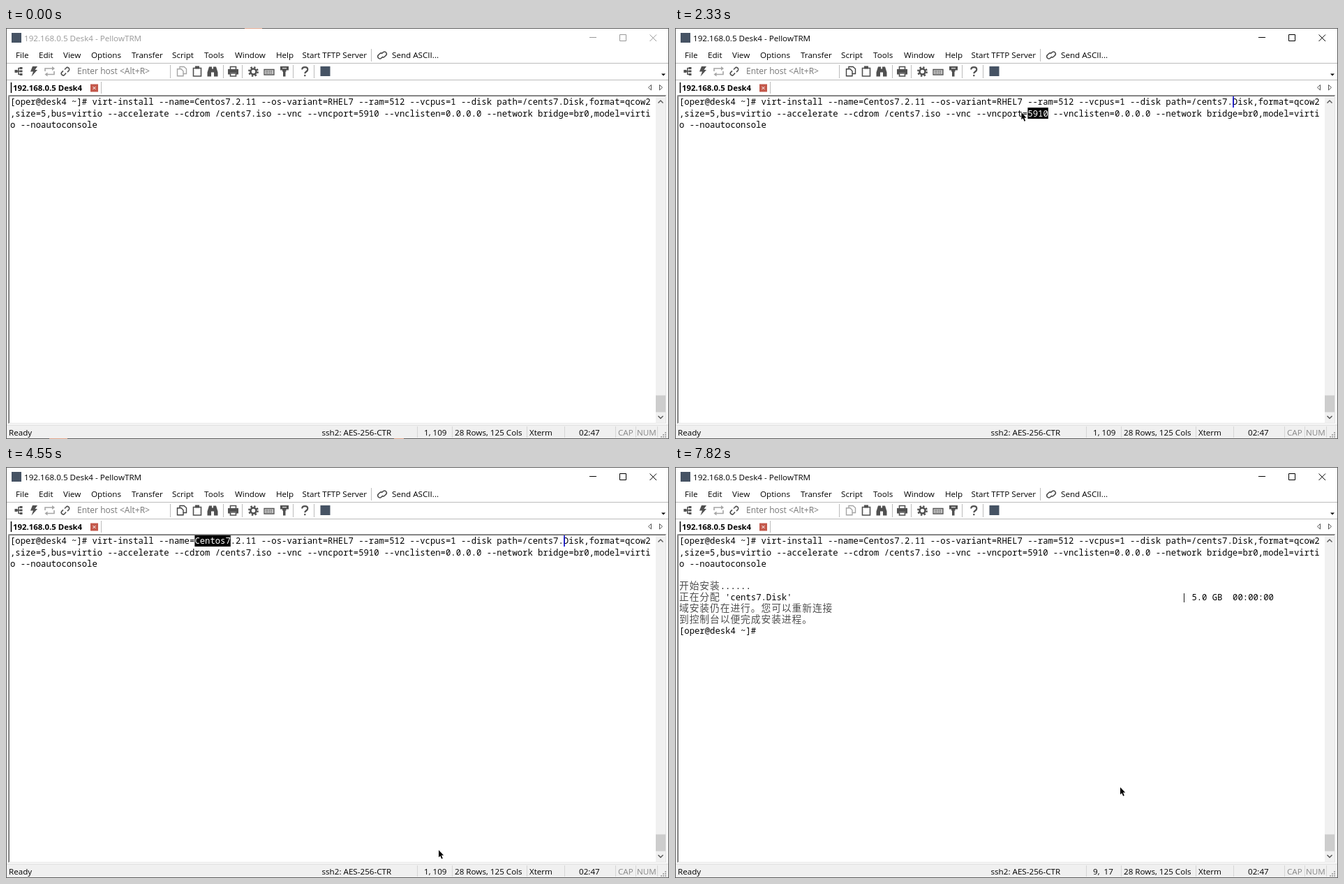
Write an HTML page that moves like this. It is 950x589 px and loops after 7.99 s.

```html
<!DOCTYPE html>
<html lang="en">
<head>
<meta charset="utf-8">
<title>Terminal session</title>
<style>
  html, body { margin: 0; width: 100%; height: 100%; overflow: hidden; background: #fff; }
  svg { display: block; width: 100vw; height: 100vh; }
  text { white-space: pre; }
  .ui text { font: 11.65px "Open Sans", "Noto Sans", sans-serif; }
  .term text { font: 12.24px "Noto Sans Mono", "DejaVu Sans Mono", monospace; }
  .term .cjk { font: 100 13.8px "Noto Sans CJK SC", "Noto Sans CJK", sans-serif; letter-spacing: .89px; fill: #505050; }
  .ui .bold { font-size: 11.4px; font-weight: 700; }
  .ui .host { font-size: 12.05px; fill: #777; }
  .icon { fill: none; stroke: #505050; stroke-width: 1.6; }
  .solid { fill: #505050; stroke: none; }
  .rule { stroke: #bcbcbc; fill: none; }
</style>
</head>
<body>
<svg viewBox="0 0 950 589" preserveAspectRatio="none">
  <rect width="950" height="589" fill="#fff"/>
  <g class="ui">
    <rect x="8" y="7" width="14" height="14" fill="#465364"/>
    <g id="caption">
      <text x="26" y="18.5" fill="currentColor">192.168.0.5 Desk4 - PellowTRM</text>
      <path d="M836 13.5h10M879.5 9.5h9v9h-9zM922.5 9.5l9.5 9.5M932 9.5l-9.5 9.5" fill="none" stroke="currentColor"/>
    </g>
    <g id="menu"></g>
    <path class="rule" d="M523.5 30v18M1 50.5h948M1 74.5h948M235.5 53v19M311.5 53v19M338.5 53v19M411.5 53v19M441.5 53v19"/>

    <!-- toolbar -->
    <g class="icon">
      <path d="M-1 -2l2.5-2.3a3 3 0 0 1 4.2 4.2l-2.3 2.3a3 3 0 0 1-3.6.4M1 2l-2.5 2.3a3 3 0 0 1-4.2-4.2l2.3-2.3a3 3 0 0 1 3.6-.4" transform="translate(539 39)"/>
      <path d="M13 62h5M18 57v10M18 57.5h2M18 62h2M18 66.5h2"/>
      <path class="solid" d="M20 56h3.500v3h-3.500zM20 60.500h3.500v3h-3.500zM20 65h3.500v3h-3.500zM12.500 60h4v4h-4z"/>
      <path class="solid" d="M38 55h7l-3.500 5h3.500l-8.500 9.500 2.500-7h-4z"/>
      <path d="M56 62v-4h11M69 62v4.500h-11" stroke="#a5a5a5"/>
      <path d="M66 55l4 3-4 3zM59.500 63.500l-4 3 4 3z" fill="#a5a5a5" stroke="none"/>
      <path d="M84 59.500l2-2a2.600 2.600 0 0 1 4 3.600l-2 2M86 64.500l-2 2.500a2.600 2.600 0 0 1-4-3.600l2-2"/>
      <g id="copy" stroke="currentColor">
        <path d="M249 58.500v-3h6l3.500 3v7h-4M245.500 58.800h5.500l3 3v7h-8.500z" stroke-width="1.400"/>
      </g>
      <path d="M268.500 57.500h11v11.500h-11z"/>
      <path class="solid" d="M271 54.500h6v4h-6z"/>
      <path class="solid" d="M291 55.500h4v3h2v-3h4l2.500 8v6h-5.500v-6h-4v6h-5.500v-6z"/>
      <path d="M321.500 59v-3.500h8v3.500M321.500 65h8v4h-8z"/>
      <path class="solid" d="M318 59h15v7.500h-3v-2.500h-9v2.500h-3z"/>
      <circle cx="354.500" cy="62.500" r="4" stroke-width="2.600"/>
      <circle cx="354.500" cy="62.500" r="6.200" stroke-width="2.400" stroke-dasharray="2.430"/>
      <path d="M370 59.500h14v7.500h-14z" fill="#d8d8d8" stroke-width="1.300"/>
      <path d="M372 62h10.500M372 64.500h10.500" stroke-dasharray="1.500 1"/>
      <path class="solid" d="M393 55h12v5.500h-3.500v2h-1v7h-3.500v-7h-1v-2h-3z"/>
      <path d="M396 57.700h6" stroke="#fff" stroke-width="1"/>
      <path d="M424.300 59.500c0-4.500 8-4.500 8 0c0 3-4 3-4 5.800M428.300 67v2.300" stroke-width="2.200"/>
    </g>
    <rect x="450.500" y="55" width="14" height="14" fill="#465364"/>
    <text class="host" x="102" y="66">Enter host &lt;Alt+R&gt;</text>
    <path d="M939 65.500h6l-3 3z"/>

    <!-- tab -->
    <path d="M7.500 78v15" stroke="#000" stroke-width="1.500"/>
    <path class="rule" d="M136.500 77v17" stroke="#ddd"/>
    <text class="bold" x="10" y="89.500">192.168.0.5 Desk4</text>
    <rect x="121" y="80.500" width="11" height="11" fill="#c4594c"/>
    <path d="M124.500 84l4 4M128.500 84l-4 4" stroke="#fff"/>
    <path d="M924.500 81.500v7.500l-4-3.750zM936.500 81.500v7.500l4-3.750z" fill="none" stroke="#555"/>

    <!-- sunken frame and scroll bar -->
    <g fill="none">
      <path d="M3.500 567v-470.500h942.500" stroke="#a0a0a0"/>
      <path d="M4.500 566v-468.500h940.500" stroke="#696969"/>
      <path d="M4 566.500h941.500v-469" stroke="#e3e3e3"/>
    </g>
    <rect x="931" y="98.500" width="14" height="468" fill="#f0f0f0"/>
    <rect x="931" y="526.500" width="14" height="24" fill="#cdcdcd"/>
    <path d="M934.500 107.500l3.500-3.500 3.500 3.500M934.500 556l3.500 3.500 3.500-3.500" fill="none" stroke="#555" stroke-width="1.400"/>

    <!-- status bar -->
    <rect x="1" y="569" width="948" height="19" fill="#f0f0f0"/>
    <path d="M1 569h948" stroke="#d9d9d9"/>
    <path d="M589.500 571v16M639.500 571v16M746.500 571v16M800.500 571v16M873.500 571v16M902.500 571v16M933.500 571v16" stroke="#d6d6d6"/>
    <path d="M945 579v8M942 582v5M939 585v2" stroke="#aaa" stroke-width="2" stroke-dasharray="2 1"/>
    <g id="status"></g>
    <text id="place" x="599" y="584"></text>
  </g>
  <g class="term" id="term"></g>
  <rect id="caret" width="1.700" height="16" fill="#1414d0"/>
  <rect x=".5" y=".5" width="949" height="588" fill="none" stroke="#5c5c5c"/>
  <path id="behind" d="M342 .5h25M62 588.500h26M556 588.500h14" stroke="#e0a58c"/>
  <path id="mouse" d="M0 0V10.300L2.300 8.200L4.100 12.600L5.800 11.900L4 7.600H7.200Z" stroke="#fff" stroke-width=".8" paint-order="stroke"/>
</svg>
<script>
const LOOP = 7990, TICK = 155;
const CELL = 7.344, ROW = 16.1, LEFT = 6, TOP = 98, BASELINE = 12.4;
const $ = id => document.getElementById(id);
const colX = c => LEFT + c * CELL;
const rowY = r => TOP + r * ROW;
const show = (el, yes) => el.setAttribute('visibility', yes ? 'visible' : 'hidden');
const within = (t, spans) => spans.some(([a, b]) => t >= a && t < b);

function add(parent, tag, attrs, content = '') {
  const el = document.createElementNS('http://www.w3.org/2000/svg', tag);
  for (const k in attrs) el.setAttribute(k, attrs[k]);
  el.textContent = content;
  return parent.appendChild(el);
}

[['File', 14], ['Edit', 47], ['View', 82], ['Options', 122], ['Transfer', 180],
 ['Script', 238], ['Tools', 284], ['Window', 328], ['Help', 387],
 ['Start TFTP Server', 424.5], ['Send ASCII...', 553]]
  .forEach(([s, x]) => add($('menu'), 'text', { x, y: 43 }, s));

[['Ready', 4], ['ssh2: AES-256-CTR', 452.5], ['28 Rows, 125 Cols', 643],
 ['Xterm', 750], ['02:47', 821], ['CAP', 877, '#888'], ['NUM', 904, '#888']]
  .forEach(([s, x, fill = '#000']) => add($('status'), 'text', { x, y: 584, fill }, s));

const write = (parent, row, col, s, attrs = {}) =>
  add(parent, 'text', { x: colX(col), y: rowY(row) + BASELINE, ...attrs }, s);
const group = () => add($('term'), 'g', {});
const cjk = { class: 'cjk' };
const PROMPT = '[oper@desk4 ~]# ';

const command = group();
[PROMPT + 'virt-install --name=Centos7.2.11 --os-variant=RHEL7 --ram=512 --vcpus=1 --disk path=/cents7.Disk,format=qcow2',
 ',size=5,bus=virtio --accelerate --cdrom /cents7.iso --vnc --vncport=5910 --vnclisten=0.0.0.0 --network bridge=br0,model=virti',
 'o --noautoconsole'].forEach((s, r) => write(command, r, 0, s));

function selection(row, col, s) {
  const g = group();
  add(g, 'rect', { x: colX(col), y: rowY(row), width: s.length * CELL, height: 16 });
  write(g, row, col, s, { fill: '#fff' });
  return g;
}
const portMark = selection(1, 68, '5910');
const nameMark = selection(0, 36, 'Centos7');

const starting = group();
write(starting, 4, 0, '开始安装', cjk);
write(starting, 4, 8, '......');

const allocating = group();
write(allocating, 5, 0, '正在分配', cjk);
write(allocating, 5, 9, "'cents7.Disk'");
write(allocating, 5, 98, '| 5.0 GB  00:00:00');

const finished = group();
write(finished, 6, 0, '域安装仍在进行。您可以重新连接', cjk);
write(finished, 7, 0, '到控制台以便完成安装进程。', cjk);
write(finished, 8, 0, PROMPT);

// Visible spans of the blinking caret: from, to, row, column
const CARET = [
  [910, 1540, 0, 108], [2010, 2650, 0, 108], [3120, 3590, 0, 108],
  [4230, 4700, 0, 108], [5170, 5800, 0, 108], [5800, 6270, 3, 0],
  [6270, 6590, 5, 0], [6590, 6890, 6, 0], [6890, 7350, 8, 16]
];
// Pointer moves: visible from, to, ticks begin, tick count, start, end
const MOVES = [
  [760, 2330, 760, 5, [585, 575], [519.5, 122.8]],
  [2330, 3590, 2175, 5, [519.5, 122.8], [297.5, 106]],
  [3590, 4230, 3435, 5, [297.5, 106], [612, 592]],
  [4550, 4850, 4550, 1, [620, 549], [620, 549]],
  [7510, LOOP, 7510, 2, [628, 571], [638, 459]]
];
const PLACES = [[6890, '9,  17'], [6740, '7,   1'], [6270, '6,   1'], [5950, '4,   1'], [0, '1, 109']];
const PORT = [[1710, 3120]], NAME = [[3270, 4700]];
const ease = u => u * u * (3 - 2 * u);

function drawPointer(t) {
  const m = MOVES.find(([a, b]) => t >= a && t < b);
  show($('mouse'), m);
  if (!m) return;
  const [, , begin, ticks, p, q] = m;
  const u = ease(Math.min(1, Math.floor((t - begin) / TICK) / ticks));
  const [x, y] = p.map((v, i) => v + (q[i] - v) * u);
  $('mouse').setAttribute('transform', `translate(${x} ${y})`);
}

function draw(t) {
  const active = t >= 600;
  $('caption').setAttribute('color', active ? '#000' : '#999');
  show($('behind'), !active);
  $('copy').setAttribute('color', within(t, [...PORT, ...NAME]) ? '#404040' : '#a5a5a5');
  show(portMark, within(t, PORT));
  show(nameMark, within(t, NAME));
  show(starting, t >= 6270);
  show(allocating, t >= 6590);
  show(finished, t >= 6890);
  $('place').textContent = PLACES.find(([from]) => t >= from)[1];

  const c = CARET.find(([a, b]) => t >= a && t < b);
  show($('caret'), c);
  if (c) {
    $('caret').setAttribute('x', colX(c[3]));
    $('caret').setAttribute('y', rowY(c[2]));
  }
  drawPointer(t);
}

const began = performance.now();
function loop() {
  draw((performance.now() - began) % LOOP);
  requestAnimationFrame(loop);
}
loop();
</script>
</body>
</html>
```
